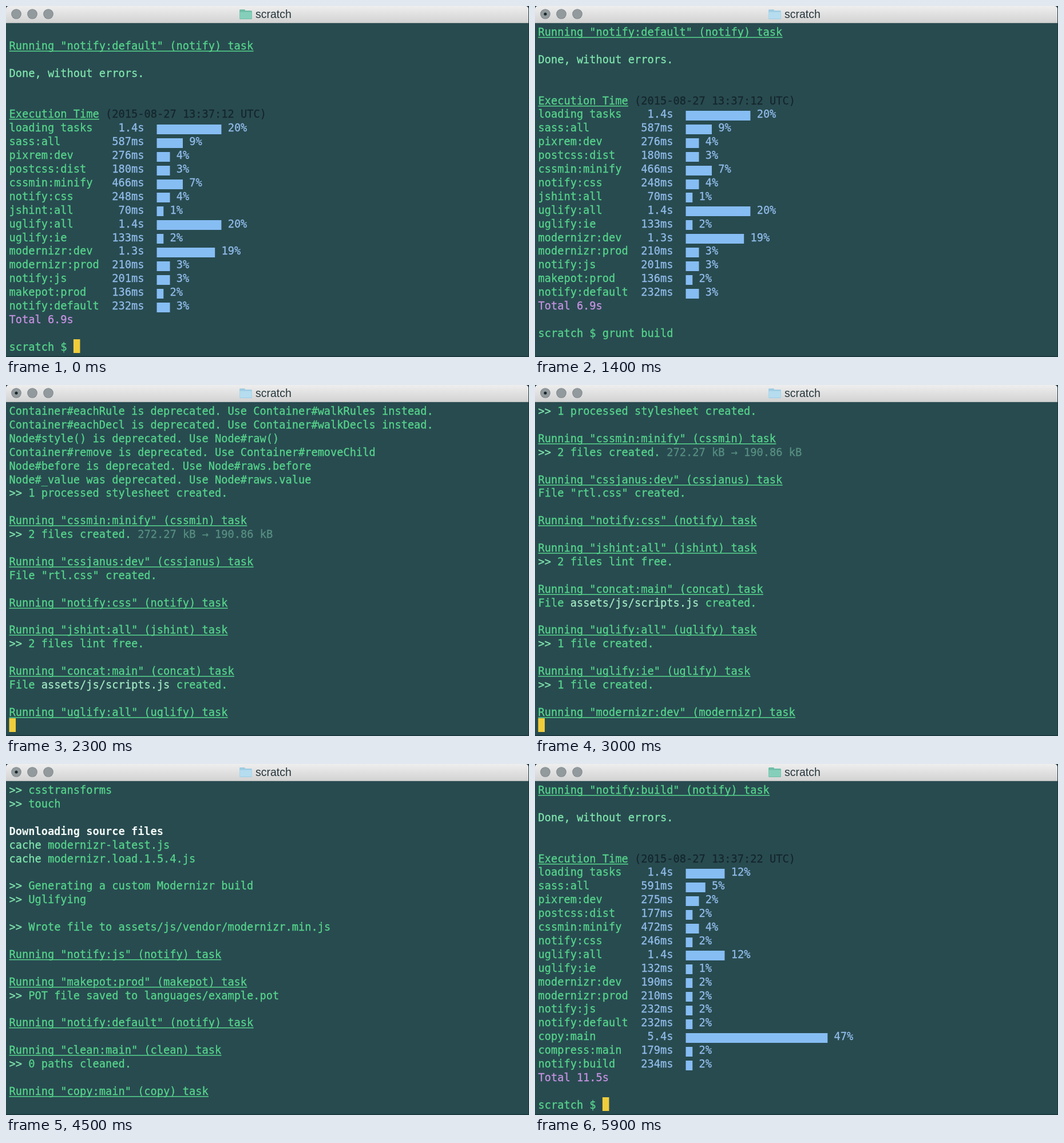
These frames come from a looping animation (914 px wide and 613 px high, 6 s). An HTML page with a canvas:

```html
<!DOCTYPE html>
<html lang="en">
<head>
<meta charset="utf-8">
<title>Terminal build</title>
<style>
  html, body { margin: 0; width: 100%; height: 100%; overflow: hidden; background: #284b50; }
  canvas { display: block; }
</style>
</head>
<body>
<canvas id="stage" width="914" height="613"></canvas>
<script>
const ctx = document.getElementById('stage').getContext('2d');
const LOOP = 6000, STEP = 100, ENTER = 900, DONE = 5900;
const ROWS = 24, CELL = 11.24, LINE = 23.9, LEFT = 5.5, BASE = 52;
const FONT = '18.67px "DejaVu Sans Mono", monospace';
const COMMAND = 'grunt build';
const C = {
  back: '#284b50', green: '#56d58b', light: '#80e6ad', pale: '#a3e9c3', white: '#f2fbf6',
  dim: '#578f80', dark: '#14272d', blue: '#91bcea', bar: '#86bdf3', purple: '#c792e2', cursor: '#efcd3b'
};

// A line is a list of spans; each span is text with a style.
const span = (text, color = C.green, style = {}) => ({ text, color, ...style });
const plain = text => [span(text)];
const blank = [];
const ok = text => [span('>>', C.light), span(' ' + text)];
const task = (name, kind = name.split(':')[0]) =>
  [span(`Running "${name}" (${kind}) task`, C.green, { underline: true })];
const heading = text => [span(text, C.white, { bold: true })];
const cached = file => [span('cache', C.light), span(' ' + file)];
const wrote = text => [span('File '), span(text, C.pale), span(' created.')];

function report(name, clock, rows, total) {
  return [
    task(name), blank, [span('Done, without errors.', C.light)], blank, blank,
    [span('Execution Time', C.green, { underline: true }), span(` (2015-08-27 ${clock} UTC)`, C.dark)],
    ...rows.map(row => {
      const [label, time, cells, share] = row.split('|');
      return [
        span(label.padEnd(15)), span(time.padStart(6) + '  ', C.blue),
        span(' '.repeat(cells), C.bar, { block: true }), span(` ${share}%`, C.blue)
      ];
    }),
    [span('Total ' + total, C.purple)], blank
  ];
}

const before = report('notify:default', '13:37:12', [
  'loading tasks|1.4s|10|20', 'sass:all|587ms|4|9', 'pixrem:dev|276ms|2|4',
  'postcss:dist|180ms|2|3', 'cssmin:minify|466ms|4|7', 'notify:css|248ms|2|4',
  'jshint:all|70ms|1|1', 'uglify:all|1.4s|10|20', 'uglify:ie|133ms|1|2',
  'modernizr:dev|1.3s|9|19', 'modernizr:prod|210ms|2|3', 'notify:js|201ms|2|3',
  'makepot:prod|136ms|1|2', 'notify:default|232ms|2|3'
], '6.9s');

const after = report('notify:build', '13:37:22', [
  'loading tasks|1.4s|6|12', 'sass:all|591ms|3|5', 'pixrem:dev|275ms|2|2',
  'postcss:dist|177ms|1|2', 'cssmin:minify|472ms|2|4', 'notify:css|246ms|1|2',
  'uglify:all|1.4s|6|12', 'uglify:ie|132ms|1|1', 'modernizr:dev|190ms|1|2',
  'modernizr:prod|210ms|1|2', 'notify:js|232ms|1|2', 'notify:default|232ms|1|2',
  'copy:main|5.4s|22|47', 'compress:main|179ms|1|2', 'notify:build|234ms|1|2'
], '11.5s');

const modernizr = [
  blank, heading('Explicitly including these tests:'), ok('csstransforms'), ok('touch'),
  blank, heading('Downloading source files'),
  cached('modernizr-latest.js'), cached('modernizr.load.1.5.4.js'),
  blank, ok('Generating a custom Modernizr build'), ok('Uglifying'),
  blank, ok('Wrote file to assets/js/vendor/modernizr.min.js'), blank
];

// Output printed at each moment of the build.
const output = [
  [0, [blank, ...before]],
  [ENTER, [plain('scratch $ ' + COMMAND)]],
  [1500, [task('copy:fonts'),
    [span('Copied '), span('6', C.pale), span(' files')], blank, task('sass:all')]],
  [1800, [blank, task('pixrem:dev')]],
  [1900, [blank, task('postcss:dist')]],
  [2000, [
    plain('Container#eachRule is deprecated. Use Container#walkRules instead.'),
    plain('Container#eachDecl is deprecated. Use Container#walkDecls instead.'),
    plain('Node#style() is deprecated. Use Node#raw()'),
    plain('Container#remove is deprecated. Use Container#removeChild'),
    plain('Node#before is deprecated. Use Node#raws.before'),
    plain('Node#_value was deprecated. Use Node#raws.value'),
    ok('1 processed stylesheet created.'), blank, task('cssmin:minify')]],
  [2200, [
    [...ok('2 files created. '), span('272.27 kB → 190.86 kB', C.dim)],
    blank, task('cssjanus:dev'), plain('File "rtl.css" created.'),
    blank, task('notify:css')]],
  [2300, [blank, task('jshint:all'), ok('2 files lint free.'),
    blank, task('concat:main'), wrote('assets/js/scripts.js'),
    blank, task('uglify:all')]],
  [2900, [ok('1 file created.'), blank, task('uglify:ie')]],
  [3000, [ok('1 file created.'), blank, task('modernizr:dev')]],
  [3100, [...modernizr, task('modernizr:prod')]],
  [3200, [...modernizr, task('notify:js')]],
  [3300, [blank, task('makepot:prod'), ok('POT file saved to languages/example.pot'),
    blank, task('notify:default')]],
  [3400, [blank, task('clean:main'), ok('0 paths cleaned.'), blank, task('copy:main')]],
  [5700, [plain('Copied 184 files'), blank, task('compress:main')]],
  [5800, [ok('Compressed 184 files.'), blank, task('notify:build')]],
  [DONE, after.slice(1)]
];

function currentLine(t) {
  if (t >= DONE) return 'scratch $ ';
  if (t >= ENTER) return '';
  return 'scratch $ ' + COMMAND.slice(0, Math.floor(t / 100 * 1.4));
}

function drawSpan({ text, color, bold, underline, block }, col, base) {
  const x = LEFT + col * CELL, width = text.length * CELL;
  ctx.fillStyle = ctx.strokeStyle = color;
  if (block) {
    ctx.fillRect(x - 0.5, Math.round(base - 12.3), width + 0.5, 17);
    return;
  }
  ctx.font = (bold ? 'bold ' : '') + FONT;
  ctx.fillText(text, x, base);
  if (!bold) ctx.strokeText(text, x, base);
  if (underline) ctx.fillRect(x, Math.round(base) + 2, width, 1.5);
}

function drawTerminal(t) {
  ctx.fillStyle = C.back;
  ctx.fillRect(0, 30, 914, 583);
  const typed = currentLine(t);
  const lines = output.filter(([at]) => at <= t).flatMap(([, added]) => added);
  lines.push(plain(typed));
  ctx.lineWidth = 0.3;
  lines.slice(-ROWS).forEach((line, row) => {
    let col = 0;
    for (const part of line) {
      drawSpan(part, col, BASE + row * LINE);
      col += part.text.length;
    }
  });
  if ((t + 200) % 600 < 300) {
    ctx.fillStyle = C.cursor;
    ctx.fillRect(LEFT + typed.length * CELL, 582, CELL + 0.3, 24);
  }
  ctx.fillStyle = '#18343b';
  ctx.fillRect(0, 611.5, 914, 1.5);
  ctx.fillRect(913, 30, 1, 583);
}

function disc(x, y, r, color) {
  ctx.fillStyle = color;
  ctx.beginPath();
  ctx.arc(x, y, r, 0, Math.PI * 2);
  ctx.fill();
}

function drawTitleBar(running) {
  const shade = ctx.createLinearGradient(0, 0, 0, 30);
  shade.addColorStop(0, '#eeeeee');
  shade.addColorStop(1, '#d2d2d2');
  ctx.fillStyle = '#20393f';
  ctx.fillRect(0, 0, 914, 30);
  ctx.fillStyle = shade;
  ctx.beginPath();
  ctx.roundRect(0, 0, 913, 30, [5, 5, 0, 0]);
  ctx.fill();
  ctx.fillStyle = '#aeb3b4';
  ctx.fillRect(0, 29, 913, 1);

  for (const x of [18, 46, 74]) {
    disc(x, 14, 8.8, '#7c8589');
    disc(x, 14, 7.9, '#929a9d');
  }
  if (running) disc(18, 14, 2.6, '#18262b');

  ctx.fillStyle = running ? '#9fcde3' : '#70bea8';
  ctx.beginPath();
  ctx.roundRect(408, 6, 10, 6, 1.5);
  ctx.roundRect(408, 8, 22, 15, 1.5);
  ctx.fill();
  ctx.fillStyle = running ? '#b5ddef' : '#85cfba';
  ctx.fillRect(408.5, 10.5, 21, 11.5);

  ctx.font = '19.5px "Liberation Sans", Arial, sans-serif';
  ctx.fillStyle = '#28383d';
  ctx.fillText('scratch', 436, 21);
}

function frame(now) {
  const t = Math.floor(now % LOOP / STEP) * STEP;
  drawTerminal(t);
  drawTitleBar(t >= ENTER && t < DONE);
  requestAnimationFrame(frame);
}
frame(0);
</script>
</body>
</html>
```
